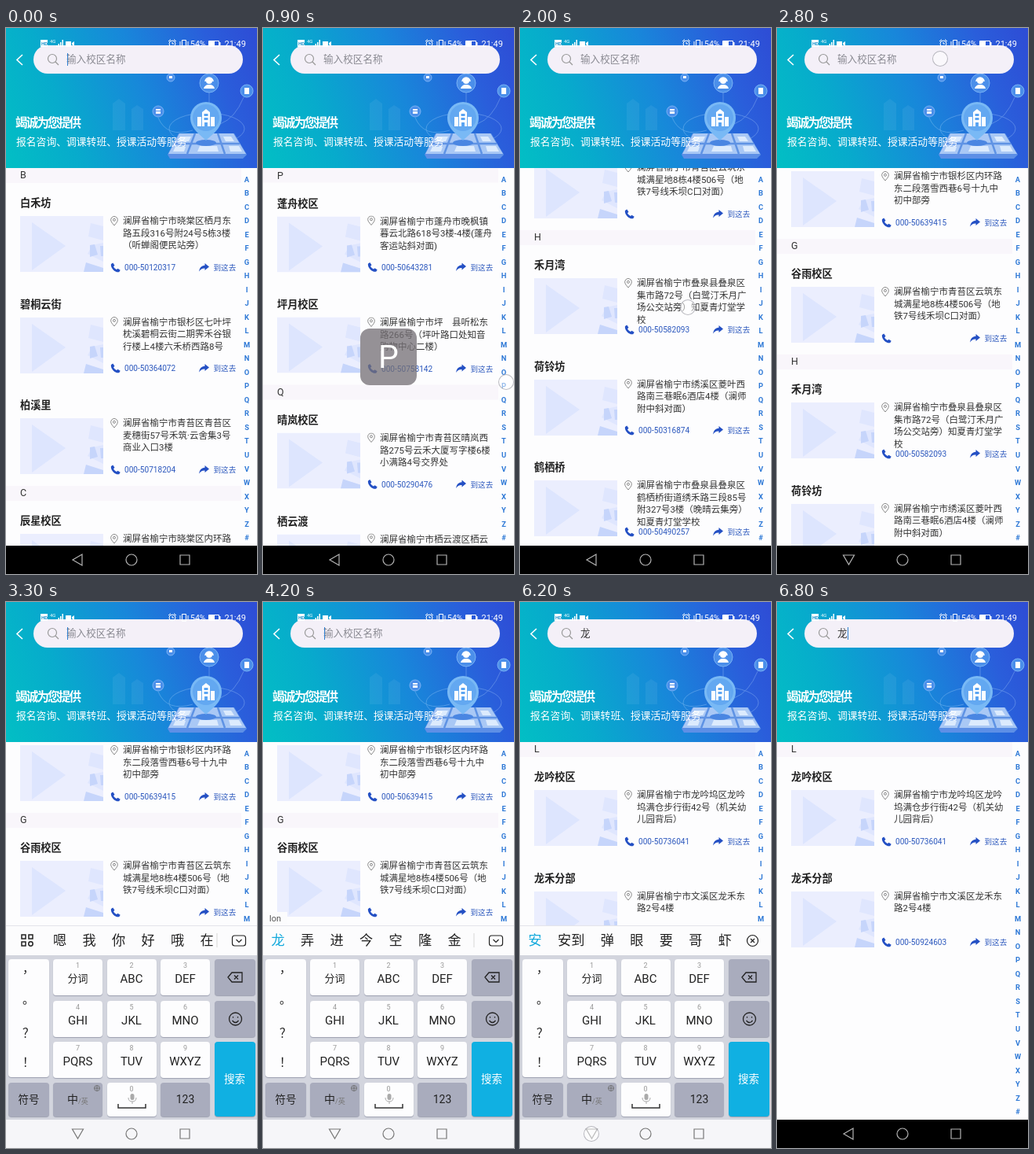
An HTML page that plays this animation: 320x694 px, repeating every 6.9 s.

```html
<!DOCTYPE html>
<html lang="zh-CN">
<head>
<meta charset="utf-8">
<title>校区查询</title>
<style>
html, body { margin: 0; width: 100%; height: 100%; overflow: hidden; background: #fdfdfe; }
body { font-family: Roboto, "Noto Sans CJK SC", "Noto Sans CJK", sans-serif; color: #333; }
#stage { position: absolute; left: 0; top: 0; width: 320px; height: 694px; overflow: hidden; background: #fdfdfe; }
#stage div, #stage svg, #stage span.abs { position: absolute; white-space: nowrap; }
svg { overflow: visible; }
.list { left: 0; top: 178px; width: 320px; }
.head { left: 0; width: 300px; height: 18.5px; background: #f9f6fb; font-size: 12.5px; line-height: 18.5px; text-indent: 18px; }
.row { left: 0; width: 300px; height: 128.5px; }
.name { left: 18px; top: 17.5px; font-size: 13.2px; font-weight: 700; line-height: 18px; color: #222; }
.addr { left: 149px; top: 41.7px; font-size: 11.5px; line-height: 15.5px; }
#stage .addr { white-space: pre; }
.tel, .go { top: 100px; line-height: 15px; color: #2b57bd; }
.tel { left: 151px; font-size: 10.1px; }
.go { left: 264.5px; font-size: 9.6px; }
#banner { left: 0; top: 0; width: 320px; height: 178px; overflow: hidden;
  background: linear-gradient(70deg, #02bfc4 0%, #07abcc 25%, #1887da 55%, #2a5edb 82%, #2e4cd5 100%); }
#banner div { color: #fff; }
#field { left: 35px; top: 22px; width: 267px; height: 36px; border-radius: 18px; background: #f4f0f8; }
#word { left: 77px; top: 31px; font-size: 12.6px; line-height: 18px; }
#caret { top: 32px; width: 1.5px; height: 16px; background: #2f7fd0; }
#index { left: 297px; top: 183.7px; width: 20px; font-size: 9.3px; font-weight: 700; line-height: 17.52px; text-align: center; color: #2d78d6; }
#index span { display: block; }
#bubble { left: 124px; top: 382px; width: 72px; height: 72px; border-radius: 12px; background: rgba(118,112,118,.76);
  color: #fff; font-size: 41px; line-height: 73px; text-align: center; }
#touch { width: 18px; height: 18px; margin: -10px; border: 1px solid rgba(130,130,140,.55); border-radius: 50%; background: rgba(255,255,255,.5); }
#board { left: 0; top: 411px; width: 320px; height: 247px; background: #d3d5de; }
#bar { left: 0; top: 0; width: 320px; height: 37.5px; background: #fcfcfd; border-top: 1px solid #e3e4ea; box-sizing: border-box; }
#words { display: flex; gap: 20.3px; top: 6px; font-size: 17.2px; line-height: 25px; color: #222; }
#words.hot span:first-child { color: #12a9dc; }
#spell { left: 0; top: -17px; padding: 0 8px; height: 17px; background: #fcfcfd; font-size: 11px; line-height: 17px; color: #555; }
.key { border-radius: 4px; background: #fdfdfe; box-shadow: 0 1px 1px #9da0b0; text-align: center; color: #222; }
.key.dark { background: #a9acbd; }
.key.blue { background: #10b0e2; color: #fff; }
.key.down { background: #c4c7d2; }
.key small { position: absolute; left: 0; right: 0; top: 2px; font-size: 9px; line-height: 12px; color: #999; }
#nav { left: 0; top: 658px; width: 320px; height: 36px; background: #000; color: #b4b4b4; }
#nav.light { background: #f6f6f9; color: #777; }
</style>
</head>
<body>
<svg width="0" height="0" style="position:absolute">
  <symbol id="thumb" viewBox="0 0 106 71">
    <path fill="#ebeefe" d="M0 0h106v71H0z"/>
    <path fill="#dde5fe" d="M15 8 58 38 15 69z"/>
    <path fill="#dfe6fe" d="M90 9 106 13V31L87 26zM92 37 106 34V58L86 48z"/>
    <path fill="#c6d5fb" d="M89 37 95 36 99 49 89 52zM102 38h4v13h-3zM81 71 84 59 106 66V71z"/>
  </symbol>
  <symbol id="pin" viewBox="0 0 10 13" fill="none" stroke="#888">
    <path d="M5 12C2 8.500.7 7 .7 4.800a4.300 4.300 0 0 1 8.600 0C9.300 7 8 8.500 5 12z"/><circle cx="5" cy="4.800" r="1.500"/>
  </symbol>
  <symbol id="phone" viewBox="0 0 13 13">
    <path fill="#2450c4" d="M1 2 3.300.5 5.500 3.800 4 5.300C5 7.300 6.300 8.200 8 9L9.500 7.700 12.700 9.800 11.200 12.200C6.500 13.500-.2 7 1 2z"/>
  </symbol>
  <symbol id="share" viewBox="0 0 13 11">
    <path fill="#2450c4" d="M7.500 0 13 4.600 7.500 9V6.400C4 6.200 2 7.500.2 10.500.5 6 3 3 7.500 2.700z"/>
  </symbol>
</svg>

<div id="stage">
  <div id="all" class="list"></div>
  <div id="found" class="list"></div>
  <div id="index"></div>

  <div id="banner">
    <svg width="320" height="178">
      <g fill="#fff" opacity=".06"><path d="M136 96 144 90 152 96V130H136zM160 103 167 98 175 103V130H160z"/></g>
      <g fill="none" stroke="#bfe2ff" opacity=".3"><path d="M194 114Q205 140 238 130M259 82V98M303 88Q292 115 273 122"/><ellipse cx="256" cy="128" rx="48" ry="20"/></g>
      <path fill="#5d8fe6" d="M220 134H291L307 161 302 166H209L206 161z"/>
      <path fill="#a9c8f5" d="M221 134H290L306 160H207z"/>
      <path fill="none" stroke="#5f93e4" stroke-width="2.500" d="M214 147H298M241 134 231 160M270 134 279 160"/>
      <path fill="#dcebfd" d="M223 138h13l-3 6h-13zM247 150h22l2 7h-27zM277 138h10l4 6h-11zM284 150h13l4 7h-15zM216 151h13l-2 6h-14z"/>
      <ellipse cx="255" cy="146" rx="13" ry="4" fill="#4a86e2"/>
      <path fill="#79b9f5" d="M255 143C247 135 235 128 235 114a20 20 0 0 1 40 0C275 128 263 135 255 143z"/>
      <circle cx="255" cy="114" r="17" fill="#63a8f1"/>
      <path fill="#fff" d="M250 125V107L255 103 260 107V125zM244 113h5v12h-5zM261 113h5v12h-5z"/>
      <path fill="#5aa4f2" d="M252.500 109h5v3h-5zM252.500 114h5v3h-5zM253 120h4v5h-4z"/>
      <g fill="#4b8fea" stroke="#79b2f5"><circle cx="194" cy="106" r="7"/><circle cx="259" cy="70" r="12"/><circle cx="307" cy="80" r="8"/><circle cx="210" cy="63" r="5"/></g>
      <g fill="#fff"><circle cx="259" cy="67" r="4"/><path d="M252 77q1-5 7-5t7 5zM191 103h6v2h-6zM191 106h6v3h-6zM304 76h6v8h-6zM208 61h4v3h-4z"/></g>
      <path fill="none" stroke="#fff" stroke-width="1.500" d="M254 68a5 5 0 0 1 10 0"/>
      <path fill="none" stroke="#fff" stroke-width="1.600" d="M21 34 14 40.500 21 47"/>
    </svg>
    <div style="left:12px;top:110px;font-size:15.500px;font-weight:700;line-height:22px;letter-spacing:-1.800px">竭诚为您提供</div>
    <div style="left:13px;top:135px;font-size:12.800px;line-height:19px">报名咨询、调课转班、授课活动等服务</div>
  </div>

  <div id="field"></div>
  <svg style="left:52px;top:32px" width="16" height="16" fill="none" stroke="#999" stroke-width="1.200"><circle cx="7" cy="7" r="5.500"/><path d="M11 11 15 15"/></svg>
  <div id="word"></div>
  <div id="caret"></div>

  <svg width="320" height="30" fill="#fff" font-size="11">
    <path d="M44 15h9v9h-9z"/><text x="45" y="22" font-size="6" font-weight="700" fill="#1590cc">HD</text>
    <text x="56" y="19" font-size="6">4G</text>
    <path d="M64 22h1.500v2H64zM66.500 20H68v4h-1.500zM69 18h1.500v6H69zM71.500 15H73v9h-1.500zM76 17h7v7h-7zM84 19 87 17v6l-3-2z"/>
    <g fill="none" stroke="#fff"><circle cx="212" cy="20" r="4"/><path d="M207 17 210 14.500M217 17 214 14.500M212 18v2h2M224.500 15.500h5v9h-5zM222 17v6M232 17v6M258.500 16.500h13v7h-13z"/></g>
    <path d="M259 17h7v6h-7zM272 18h1.500v4H272z"/>
    <text x="235" y="24" font-size="10.500">54%</text><text x="278.500" y="24">21:49</text>
  </svg>

  <div id="board">
    <div id="bar">
      <svg id="grid" style="left:19px;top:10px" width="16" height="16" fill="none" stroke="#222" stroke-width="1.500"><path d="M1 1h5v5H1zM10 1h5v5h-5zM1 10h5v5H1z"/><circle cx="12.500" cy="12.500" r="2.700"/></svg>
      <div id="words"></div>
      <svg id="fold" style="left:269px;top:0" width="50" height="37" fill="none" stroke="#222" stroke-width="1.200"><path stroke="#ddd" d="M0 9v18"/><rect x="19.500" y="12" width="17" height="13" rx="3"/><path d="M24.500 17 28 20.500 31.500 17"/></svg>
      <svg id="clear" style="left:288px;top:10px" width="17" height="17" fill="none" stroke="#222" stroke-width="1.200"><circle cx="8.500" cy="8.500" r="7"/><path d="M6 6 11 11M11 6 6 11"/></svg>
    </div>
    <div id="spell"></div>
  </div>
  <div id="nav">
    <svg width="320" height="36" fill="none" stroke="currentColor" stroke-width="1.200"><path id="back"/><circle cx="160" cy="18" r="7"/><path d="M222 12h12v12h-12z"/></svg>
  </div>
  <div id="bubble"></div>
  <div id="touch"></div>
</div>

<script>
const $ = id => document.getElementById(id);
const add = (parent, cls, html, style = "") => {
  const el = document.createElement("div");
  el.className = cls; el.innerHTML = html; el.style.cssText = style;
  parent.append(el);
  return el;
};

// letter | name | phone | address after the city (lines split by /)
const campuses = `B|白禾坊|000-50120317|晓棠区栖月东/路五段316号附24号5栋3楼/（听蝉阁便民站旁）
B|碧桐云街|000-50364072|银杉区七叶坪/枕溪碧桐云街二期霁禾谷银/行楼上4楼六禾桥西路8号
B|柏溪里|000-50718204|青苔区青苔区/麦穗街57号禾筑·云舍集3号/商业入口3楼
C|辰星校区|000-50291746|晓棠区内环路/东二段18号3楼
D|稻香坞|000-50447120|银杉区稻香坞/路26号2楼
F|枫禾校区|000-50639415|银杉区内环路/东二段落雪西巷6号十九中/初中部旁
G|谷雨校区||青苔区云筑东/城满星地8栋4楼506号（地/铁7号线禾坝C口对面）
H|禾月湾|000-50582093|叠泉县叠泉区/集市路72号（白鹭汀禾月广/场公交站旁）知夏青灯堂学/校
H|荷铃坊|000-50316874|绣溪区菱叶西/路南三巷眠6酒店4楼（澜师/附中斜对面）
H|鹤栖桥|000-50490257|叠泉县叠泉区/鹤栖桥街道绣禾路三段85号/附327号3楼（晚晴云集旁）/知夏青灯堂学校
J|镜月校区|000-50167739|绣溪区镜月西/路31号2楼
L|龙吟校区|000-50736041|龙吟坞区龙吟/坞满仓步行街42号（机关幼/儿园背后）
L|龙禾分部|000-50924603|文溪区龙禾东/路2号4楼
P|蓬舟校区|000-50643281|蓬舟市晚枫镇/暮云北路618号3楼-4楼(蓬舟/客运站斜对面)
P|坪月校区|000-50758142|坪　县听松东/路266号（坪叶路口处知音/购物中心二楼）
Q|晴岚校区|000-50290476|青苔区晴岚西/路275号云禾大厦写字楼6楼/小满路4号交界处
Q|栖云渡|000-50871364|栖云渡区栖云/路19号3楼
S|霜叶校区|000-50412598|银杉区霜叶南/路63号2楼
W|雾溪校区|000-50375216|文溪区雾溪北/路47号3楼
X|杏雨校区|000-50683907|晓棠区杏雨西/路12号2楼
Y|月梨校区|000-50519462|绣溪区月梨东/路29号4楼
Z|竹烟校区|000-50837150|文溪区竹烟南/路54号2楼`.split("\n").map(s => s.split("|"));

const icon = (id, x, y, w, h) =>
  `<svg style="left:${x}px;top:${y}px" width="${w}" height="${h}"><use href="#${id}"/></svg>`;

function fill(list, items) {
  const tops = {};
  let y = 0;
  for (const [letter, name, tel, addr] of items) {
    if (!(letter in tops)) {
      tops[letter] = y;
      add(list, "head", letter, `top:${y}px`);
      y += 18.5;
    }
    add(list, "row", icon("thumb", 18, 42.5, 106, 71) + icon("pin", 133, 42, 10, 13) +
      icon("phone", 133, 101, 13, 13) + icon("share", 246, 102, 13, 11) +
      `<div class="name">${name}</div><div class="addr">澜屏省榆宁市${addr.replaceAll("/", "\n")}</div>` +
      `<div class="tel">${tel}</div><div class="go">到这去</div>`, `top:${y}px`);
    y += 128.5;
  }
  return tops;
}
const tops = fill($("all"), campuses);
fill($("found"), campuses.filter(c => c[0] === "L"));
$("index").innerHTML = [..."ABCDEFGHIJKLMNOPQRSTUVWXYZ#"].map(c => `<span>${c}</span>`).join("");

// keyboard
const cols = [3, 60, 128.5, 197, 265.5], rows = [43, 95.5, 148, 200], keys = {};
function key(col, row, label, { cls = "", hint = "", size = 15, h = 46 } = {}) {
  const w = col % 4 ? 63 : 52;
  const el = add($("board"), "key " + cls, (hint && `<small>${hint}</small>`) + label,
    `left:${cols[col]}px;top:${rows[row]}px;width:${w}px;height:${h}px;line-height:${h + (hint ? 4 : 0)}px;font-size:${size}px`);
  keys[label] = el;
  return el;
}
key(0, 0, [..."，。？！"].map((c, i) => `<div style="left:18px;top:${[1, 40, 83, 120][i]}px;line-height:22px">${c}</div>`).join(""), { h: 150 });
["分词", "ABC", "DEF", "GHI", "JKL", "MNO", "PQRS", "TUV", "WXYZ"].forEach((s, i) =>
  key(1 + i % 3, i / 3 | 0, s, { hint: String(i + 1), size: i ? 15 : 13 }));
const dark = { cls: "dark", size: 14, h: 43 };
const glyph = d => `<svg style="left:16px;top:13px" width="21" height="20" fill="none" stroke="#222" stroke-width="1.3">${d}</svg>`;
key(4, 0, glyph('<path d="M1 10 6 4H19V16H6zM9 7.500 14 12.500M14 7.500 9 12.500"/>'), { cls: "dark" });
key(4, 1, glyph('<circle cx="10.500" cy="10" r="8"/><path d="M6.500 12q4 5 8 0M7.500 7v1.500M13.500 7v1.500"/>'), { cls: "dark" });
key(4, 2, "搜索", { cls: "blue", size: 13.5, h: 95 });
key(0, 3, "符号", { ...dark, size: 13.5 });
key(1, 3, '<span class="abs" style="left:18px">中</span><span class="abs" style="left:32px;top:3px;font-size:9px;color:#777">/英</span>' +
  '<svg style="left:52px;top:3px" width="8" height="8" fill="none" stroke="#666" stroke-width=".8"><circle cx="4" cy="4" r="3.500"/><path d="M.5 4h7M4 .5v7"/></svg>', dark);
key(2, 3, '<svg style="left:13px;top:13px" width="37" height="22" fill="none" stroke="#333" stroke-width="1.500"><path d="M1 14v5h35v-5"/><rect x="16.500" y="1" width="5" height="8" rx="2.500" fill="#aaa" stroke="none"/><path stroke="#aaa" stroke-width="1" d="M14 6q0 5 5 5t5-5M19 11v3"/></svg>', { hint: "0", h: 43 });
key(3, 3, "123", dark);

// timeline, ms
const touches = [ // from, to, x, y, vertical speed per ms
  [700, 1100, 310, 450, 0], [1300, 1600, 310, 315, 0], [1800, 2500, 214, 276, .395], [2700, 3000, 208, 39, 0],
  [3600, 3700, 160, 530, 0], [3900, 4000, 228, 530, 0], [4100, 4200, 228, 530, 0], [4400, 4500, 91, 530, 0],
  [4700, 4900, 19, 430, 0], [6100, 6300, 91, 676, 0]];
const taps = [[3600, "JKL"], [3900, "MNO"], [4100, "MNO"], [4400, "GHI"]];
const suggestions = [ // from, spelling, words
  [0, "", "嗯 我 你 好 哦 在"], [3600, "l", "了 来 看 就 可 六 两"], [3900, "lo", "咯 哦 进 今 仅 金 洛"],
  [4100, "lon", "龙 弄 进 今 空 隆 金"], [4400, "long", "龙 弄 空 隆 拢 笼 聋"], [4800, "", "安 安到 弹 眼 要 哥 虾"]];
const blinks = [[0, 500], [3200, 3700], [4200, 4500], [5400, 5900], [6400, 6900]];
const within = (t, a, b) => t >= a && t < b;
const clamp = v => Math.max(0, Math.min(1, v));
const show = (id, on) => { $(id).style.display = on ? "" : "none"; };

function draw(t) {
  const found = t >= 4900, typed = t >= 4800;
  const drag = Math.min(237, Math.max(0, (t - 1800) * .395));
  const scroll = t < 700 ? 0 : t < 1300 ? tops.P : tops.H - drag;
  $("all").style.transform = `translateY(${-scroll}px)`;
  show("all", !found);
  show("found", found);

  const letter = within(t, 700, 1200) ? "P" : within(t, 1300, 1700) ? "H" : "";
  $("bubble").textContent = letter;
  show("bubble", letter);

  $("word").textContent = typed ? "龙" : "输入校区名称";
  $("word").style.color = typed ? "#333" : "#8a8a92";
  $("caret").style.left = (typed ? 89.5 : 77.5) + "px";
  show("caret", blinks.some(([a, b]) => within(t, a, b)));

  const touch = touches.find(([a, b]) => within(t, a, b));
  show("touch", touch);
  if (touch) {
    const [from, , x, y, speed] = touch;
    $("touch").style.left = x + "px";
    $("touch").style.top = y + Math.min(237, (t - from) * speed) + "px";
  }

  const up = clamp((t - 2800) / 300) * clamp((6500 - t) / 300);
  $("board").style.transform = `translateY(${(1 - up) * 265}px)`;
  show("board", up > 0);
  const [from, spell, words] = suggestions.findLast(s => t >= s[0]);
  $("words").innerHTML = words.split(" ").map(w => `<span>${w}</span>`).join("");
  $("words").className = from ? "hot" : "";
  $("words").style.left = (from ? 10.5 : 60) + "px";
  $("spell").textContent = spell;
  show("spell", spell);
  show("grid", !from);
  show("fold", !typed);
  show("clear", typed);
  for (const k of ["JKL", "MNO", "GHI"])
    keys[k].classList.toggle("down", taps.some(([a, n]) => n === k && within(t, a, a + 100)));

  $("nav").className = within(t, 2900, 6500) ? "light" : "";
  $("back").setAttribute("d", within(t, 2800, 6500) ? "M84.500 12H98.500L91.500 24z" : "M97 11V25L85 18z");
}

function tick() {
  draw(Math.floor(performance.now() % 6900 / 100) * 100);
  requestAnimationFrame(tick);
}
tick();
</script>
</body>
</html>
```
